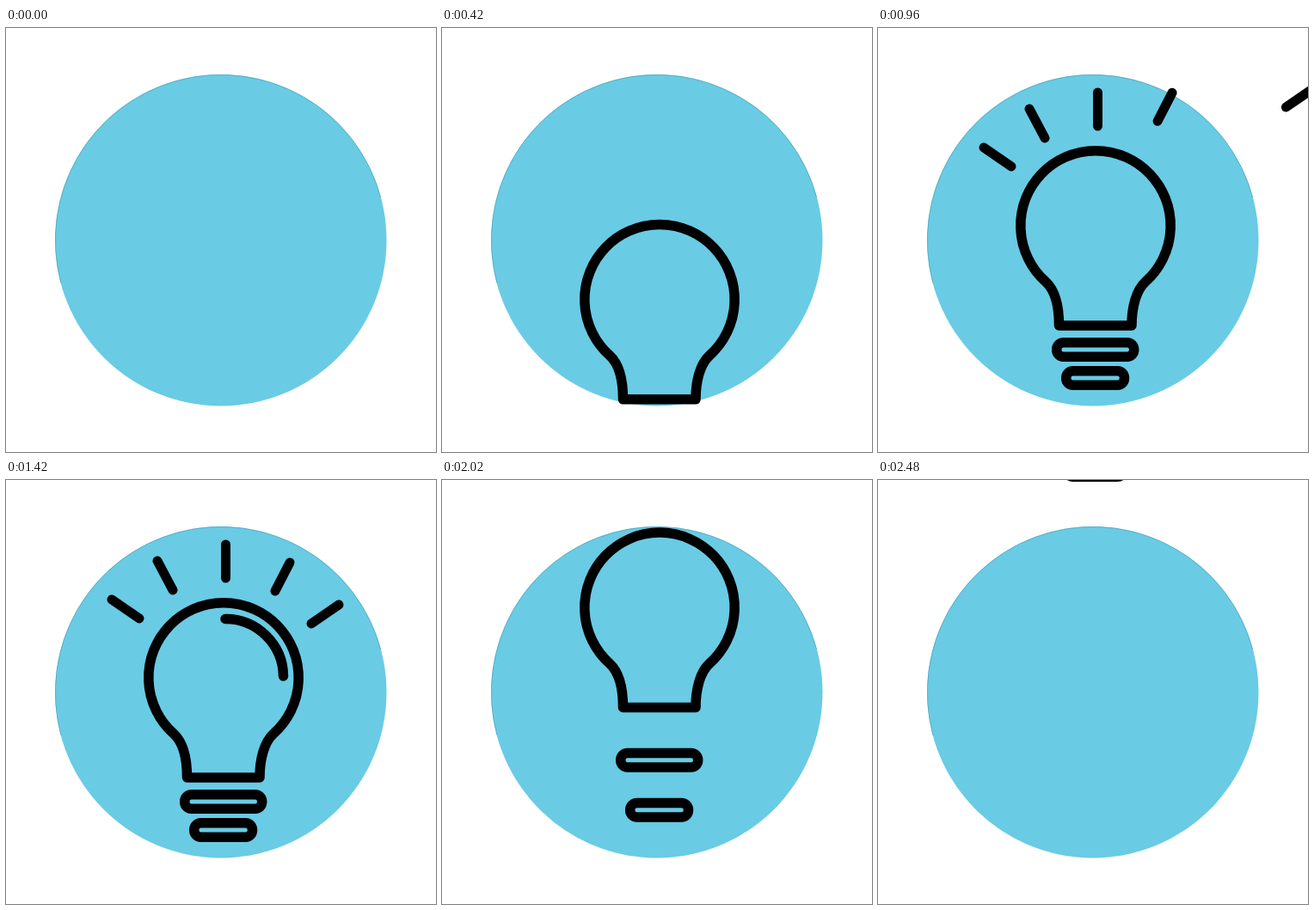
Recreate the animation shown at these times as an HTML page. Size 500 by 493 pixels, loop 2520 ms.

```html
<!DOCTYPE html>
<html lang="en">
<head>
<meta charset="utf-8">
<title>Light bulb</title>
<style>
  html, body { margin: 0; width: 100%; height: 100%; overflow: hidden; background: #fff; }
  svg { display: block; width: 100%; height: 100%; }
  .ink { fill: none; stroke: #000; stroke-width: 11.5; stroke-linecap: round; stroke-linejoin: round; }
</style>
</head>
<body>
<svg viewBox="0 0 500 493">
  <circle cx="249.8" cy="246.8" r="192.7" fill="#6acbe4"/>
  <circle cx="249.8" cy="246.8" r="192.4" fill="none" stroke="#4f9fb4" stroke-width=".6"
          pathLength="360" stroke-dasharray="180 180" transform="rotate(165 249.8 246.8)"/>
  <g class="ink">
    <path id="bulb" d="M210.5 346C210.5 325 206 305 195 295A87.2 87.2 0 1 1 311 295C300 305 295 325 295 346Z"/>
    <rect id="collar" x="207.7" y="365.7" width="90" height="16.6" rx="8"/>
    <rect id="tip" x="218.7" y="398.7" width="67.8" height="16.6" rx="8"/>
    <path id="shine" d="M255 161.5A67.5 67.5 0 0 1 322.5 228"/>
    <g id="rays" stroke-width="11"></g>
  </g>
</svg>
<script>
const LOOP = 2520, STEP = 20, LAST = 2480;
const CENTER = [253, 230];
const $ = id => document.getElementById(id);
const clamp = x => Math.min(1, Math.max(0, x));
const progress = (t, start, duration) => clamp((t - start) / duration);

// cubic-bezier(.42, 0, .58, 1)
function ease(x) {
  let lo = 0, hi = 1;
  for (let i = 0; i < 24; i++) {
    const s = (lo + hi) / 2, r = 1 - s;
    if (1.26 * s * r * r + 1.74 * s * s * r + s ** 3 < x) lo = s; else hi = s;
  }
  return lo * lo * (3 - 2 * lo);
}

// Pieces that rise in from below and leave through the top
const pieces = [
  { el: $('bulb'), start: 156, duration: 400, below: 356, leave: 1820, above: 352 },
  { el: $('collar'), start: 420, duration: 280, below: 136, leave: 1873, above: 389 },
  { el: $('tip'), start: 430, duration: 280, below: 102, leave: 1921, above: 423 }
];

// Outer end, inner end, distance to fly in along the radius
const rays = [
  [123, 139, 155, 161, 200],
  [176, 94, 194, 128, 160],
  [255.5, 75, 255.5, 114, 122],
  [330, 96, 313, 129, 157],
  [387, 145, 355, 167, 182]
].map(([x1, y1, x2, y2, distance]) => {
  const el = document.createElementNS('http://www.w3.org/2000/svg', 'path');
  el.setAttribute('d', `M${x1} ${y1}L${x2} ${y2}`);
  $('rays').append(el);
  const dx = (x1 + x2) / 2 - CENTER[0], dy = (y1 + y2) / 2 - CENTER[1];
  const k = distance / Math.hypot(dx, dy);
  return { el, dx: dx * k, dy: dy * k };
});

const move = (el, x, y) => el.setAttribute('transform', `translate(${x} ${y})`);
const fadeOut = (t, order) => 1 - progress(t, 1507 + 50 * order, 100);

function draw(t) {
  for (const { el, start, duration, below, leave, above } of pieces) {
    const enter = ease(progress(t, start, duration));
    move(el, 0, below * (1 - enter) - above * ease(progress(t, leave, 600)));
    el.style.opacity = t > start ? 1 : 0;
  }
  rays.forEach(({ el, dx, dy }, i) => {
    const start = 420 + 112 * i;
    const away = 1 - ease(progress(t, start, 280));
    move(el, dx * away, dy * away);
    el.style.opacity = t > start ? fadeOut(t, i + 1) : 0;
  });
  $('shine').style.opacity = progress(t, 1150, 200) * fadeOut(t, 0);
}

const origin = performance.now();
function tick() {
  const t = (performance.now() - origin) % LOOP;
  draw(Math.min(LAST, Math.floor(t / STEP) * STEP));
  requestAnimationFrame(tick);
}
tick();
</script>
</body>
</html>
```
